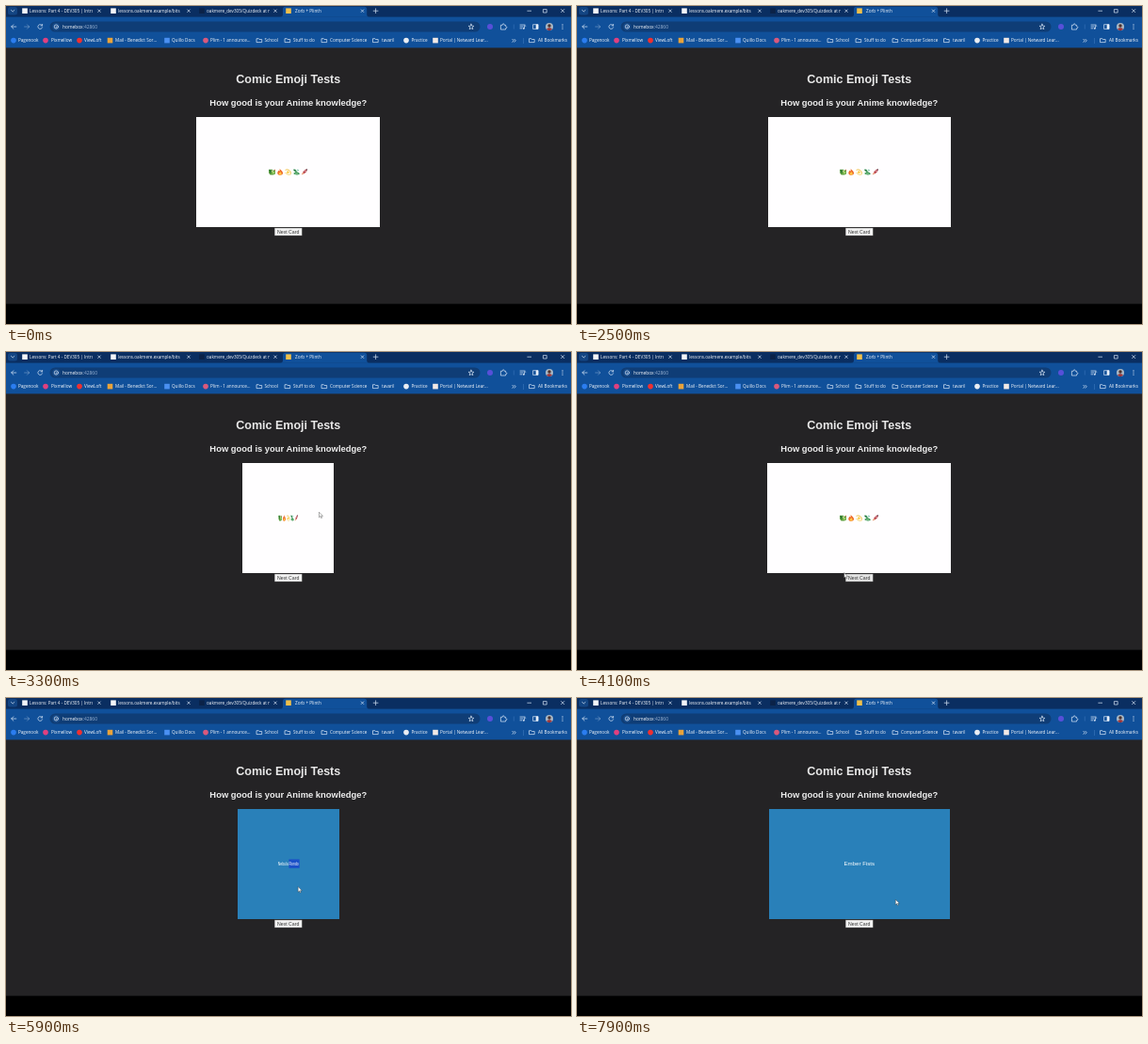
These frames come from a looping animation (600 by 338 pixels, 8 s). An HTML page:

```html
<!DOCTYPE html>
<html lang="en">
<head>
<meta charset="utf-8">
<title>Emoji cards</title>
<style>
  html, body { margin: 0; width: 100%; height: 100%; overflow: hidden; background: #000; }
  svg { display: block; }
  #stage { width: 100%; height: 100%; }
  .ui { font: 500 4.65px "Open Sans", "Noto Sans", sans-serif; fill: #f8fafd; }
  .page { font-family: "Liberation Sans", Arial, sans-serif; text-anchor: middle; }
  .line { fill: none; stroke: #dce8f8; stroke-width: .7; stroke-linecap: round; stroke-linejoin: round; }
  #face { shape-rendering: crispEdges; }
</style>
</head>
<body>
<svg id="stage" viewBox="0 0 600 338">
  <defs>
    <!-- small pictures, about 7 units across, centred on the origin -->
    <g id="lizard">
      <path d="M-3.5-2.6H0L1-1.6 3.4-2.2V2.2L1.4 3H-2L-3.5 1.2Z" fill="#5a9e3c"/>
      <path d="M-3.3-2.4H-1.2L-.6.2-2.2 1.4Z" fill="#2f7a35"/>
      <path d="M.4-1.2 3 0 1.8 2.3-.4 1.4Z" fill="#9fce6a"/>
      <circle cx=".2" cy="-1" r=".6" fill="#fff3c4"/>
      <path d="M2.2-2.2 3.4-3 3.2-.8Z" fill="#c8603a"/>
    </g>
    <g id="fire">
      <path d="M-.5-3.4C.4-2 2.9-.8 2.9 1.2 2.9 2.6 1.6 3.4 0 3.4S-2.9 2.6-2.9 1C-2.9-.2-2.1-.8-1.8-1.7-1.3-1.3-1-1-.8-.7-.4-1.6-.4-2.4-.5-3.4Z" fill="#ee6a2a"/>
      <path d="M.2-.4C.5.5 1.6.9 1.5 2 1.4 2.9.7 3.2 0 3.2S-1.5 2.8-1.5 1.9-.2.7.2-.4Z" fill="#ffc845"/>
    </g>
    <g id="swirl" fill="none" stroke-linecap="round">
      <path d="M-2.8-2.2C0-3.4 2.9-1.2 2.6 1.2" stroke="#f0b92c" stroke-width=".9"/>
      <path d="M-3 1C-2 3 1.2 3.4 2.9 2.4" stroke="#f3c950" stroke-width=".8"/>
      <path d="M-.4-1.7.2-.5 1.4-.4.5.5.8 1.7-.4 1.1-1.5 1.7-1.3.5-2.2-.4-.9-.5Z" fill="#f8c93a"/>
    </g>
    <g id="dragon">
      <path d="M-3.2-2.6C-1-3.4.2-2 .2-.8S2.2.2 3.2 1.4 2 3.3.4 3-3 3-2.8 1.6-.6.8-1.2-.2-3.4-1-3.2-2.6Z" fill="#3f9a5b"/>
      <path d="M.6-2.8 2.8-1.9 1.5-.6Z" fill="#63b8a0"/>
      <path d="M-1.6 2.1C-.4 1.4.8 1.5 1.8 2.2" fill="none" stroke="#d9efc5" stroke-width=".6"/>
      <circle cx="-1.8" cy="-1.7" r=".5" fill="#1d3b2a"/>
    </g>
    <g id="rocket">
      <path d="M3.2-3.2C1.4-3.2-.6-1.6-1.8.4L-.4 1.8C1.6.6 3.2-1.4 3.2-3.2Z" fill="#b9444e"/>
      <path d="M3.2-3.2 1.4-2.7 2.7-1.4Z" fill="#5b6470"/>
      <path d="M-1.8.4-3.2 3.2-.4 1.8Z" fill="#e58b62"/>
      <circle cx="1" cy="-1" r=".6" fill="#f3d5d5"/>
    </g>
    <g id="burst">
      <path d="M0-3.2.9-1.5 2.9-2.2 2-.2 3 1.4 1.1 1.4.4 3.2-.8 1.6-2.8 2.2-1.8.4-3.1-1.1-1.1-1.3Z" fill="#d8383a"/>
      <circle r=".9" fill="#f3a13a"/>
    </g>
    <g id="arm">
      <path d="M-2.6-3H-.4L-.2-1.6-1.4-1-1 .4C.4-.8 3.3-.4 3.3 1.5S1.4 3.1-.4 3-3.4 2.6-3.2.6Z" fill="#f8bd33"/>
      <path d="M-1 .4C-.4.8.2 1 .9 1" fill="none" stroke="#d18c1d" stroke-width=".4"/>
    </g>
    <g id="fist">
      <rect x="-3.3" y="-2.6" width="6.6" height="5.3" rx="1.8" fill="#f6b93a"/>
      <path d="M-1.5-2.2V0M.2-2.3V0M1.8-2.2V0M-2.6.6H1.4" fill="none" stroke="#cd841f" stroke-width=".45"/>
    </g>
    <g id="hat">
      <path d="M-3.4.8C-1.8 2.4 1.8 2.4 3.4.8L1.9.6C1.8-3 .7-2.4 0-2S-1.8-3-1.9.6Z" fill="#94602f"/>
      <path d="M-1.9.1C-.8.7.8.7 1.9.1" fill="none" stroke="#5e3817" stroke-width=".7"/>
    </g>
    <g id="note">
      <path d="M-1.2 2V-2.7L2.4-3.2V1.4" fill="none" stroke="#39465a" stroke-width=".8"/>
      <circle cx="-2" cy="2.1" r="1.1" fill="#39465a"/><circle cx="1.6" cy="1.5" r="1.1" fill="#39465a"/>
    </g>
    <path id="folder" d="M-2.6-1.9H-.6L0-1.1H2.7V2H-2.6Z" class="line"/>
    <path id="close" d="M-1.3-1.3 1.3 1.3M1.3-1.3-1.3 1.3" class="line"/>
  </defs>

  <rect width="600" height="338" fill="#000"/>
  <rect y="44" width="600" height="272.6" fill="#242325"/>
  <rect width="600" height="12" fill="#0a2e61"/>
  <rect y="11.6" width="600" height="32.8" fill="#10509a"/>

  <g id="chrome" class="ui">
    <rect x="2" y="1" width="10" height="8.5" rx="2.5" fill="#134583"/>
    <path d="M5.5 4.4 7.2 6 8.9 4.4" class="line"/>
    <path d="M291 11.7C293.4 11.7 294 10.4 294 9V3.5Q294 .8 296.7.8H380.5Q383.2.8 383.2 3.5V9C383.2 10.4 383.8 11.7 386.2 11.7Z" fill="#10509a"/>
    <path d="M390.2 5.2H395M392.6 2.8V7.6M553.8 5.2H557.6M570.8 3.6H574.2V7H570.8ZM589.6 3.5 592.8 6.7M592.8 3.5 589.6 6.7" class="line"/>

    <rect x="46.5" y="16.4" width="457" height="11.2" rx="5.6" fill="#0f3d76"/>
    <path d="M10.8 22H5.8M7.9 19.8 5.7 22 7.9 24.2" class="line"/>
    <path d="M19.6 22H24.6M22.5 19.8 24.7 22 22.5 24.2" class="line" opacity=".45"/>
    <path d="M38.3 20.6A2.4 2.4 0 1 0 38.6 22.8M38.6 19.4V20.9H37" class="line"/>
    <circle cx="53.3" cy="22" r="4" fill="#174b8a"/>
    <circle cx="53.3" cy="22" r="2.1" class="line"/>
    <path d="M53.3 21.9V23" class="line"/>
    <text x="60" y="23.8" font-size="4.9">homebox<tspan fill="#9db6d6">:42860</tspan></text>
    <path d="M494 19.2 494.8 21.2 496.9 21.3 495.3 22.7 495.8 24.7 494 23.6 492.2 24.7 492.7 22.7 491.1 21.3 493.2 21.2Z" class="line"/>
    <circle cx="514" cy="22" r="3" fill="#5750d8"/>
    <path d="M525.8 20.3H527.2Q527.2 18.8 528.2 18.8T529.2 20.3H530.6V21.7Q531.9 21.7 531.9 22.7T530.6 23.7V25H525.8Z" class="line"/>
    <path d="M539.3 19.5V24.5" stroke="#3b78bd" stroke-width=".6"/>
    <path d="M546 20H551M546 21.9H549M546 23.8H548M550.4 23.6V20.8L551.8 21.2" class="line"/>
    <circle cx="549.8" cy="23.8" r=".9" fill="#dce8f8"/>
    <path d="M560 19.7H565V24.4H560Z" class="line"/>
    <rect x="562.7" y="19.5" width="2.5" height="5" fill="#e8f0fa"/>
    <circle cx="577" cy="22" r="4" fill="#a9b7c4"/>
    <path d="M574.2 24.8C574.4 22.8 579.6 22.8 579.8 24.8A4 4 0 0 1 574.2 24.8Z" fill="#9c3438"/>
    <circle cx="577" cy="21" r="1.7" fill="#4a302b"/>
    <g fill="#e8f0fa"><circle cx="591" cy="19.9" r=".6"/><circle cx="591" cy="22" r=".6"/><circle cx="591" cy="24.1" r=".6"/></g>

    <path d="M537.8 35.3 539.2 36.8 537.8 38.3M539.9 35.3 541.3 36.8 539.9 38.3" class="line"/>
    <path d="M549.5 34V40" stroke="#3b78bd" stroke-width=".6"/>
  </g>

  <g class="page">
    <text x="299.8" y="82.2" font-size="12.5" font-weight="700" fill="#e8e8e8">Comic Emoji Tests</text>
    <text x="299.8" y="106.1" font-size="9.41" font-weight="700" fill="#efefef">How good is your Anime knowledge?</text>
    <g id="card">
      <rect id="face" x="-97.65" y="-58.6" width="195.3" height="117.2"/>
      <g id="front"></g>
      <g id="back" font-size="6.25" fill="#fff">
        <rect id="mark" y="-4.8" height="9.4" fill="#1b50c8"/>
        <text id="answer" y="2.2"></text>
      </g>
    </g>
    <rect id="button" x="285.2" y="236" width="29" height="8" stroke="#767676" stroke-width=".4"/>
    <text x="299.7" y="241.9" font-size="5.2" fill="#333">Next Card</text>
  </g>
  <path id="cursor" d="M0 0V5.6L1.3 4.4 2.2 6.4 3.1 6 2.2 4.1H4Z" fill="#fff" stroke="#333" stroke-width=".4"/>
</svg>

<script>
const LOOP = 8000, FLIP = 600;
const $ = id => document.getElementById(id);
const NS = "http://www.w3.org/2000/svg";

function add(parent, tag, attrs, text) {
  const el = document.createElementNS(NS, tag);
  for (const k in attrs) el.setAttribute(k, attrs[k]);
  if (text) el.textContent = text;
  return parent.appendChild(el);
}
const use = (parent, id, x, y) => add(parent, "use", { href: "#" + id, x, y });

// Tabs: icon x, text x, text width, close x, icon colour, title
[
  [20, 25, 67, 99, "#f4f6f9", "Lessons: Part 4 - DEV305 | Introduction"],
  [114, 119, 66, 194, "#f4f6f9", "lessons.oakmere.example/bits"],
  [208, 213, 67, 286, "#0b2248", "oakmere_dev305/Quizdeck at main"],
  [300, 307, 62, 378.5, "#f0c04a", "Zorb + Plinth"]
].forEach(([ix, tx, w, cx, fill, title]) => {
  add($("chrome"), "rect", { x: ix - 2.8, y: 2.4, width: 5.6, height: 5.6, fill });
  const clip = add($("chrome"), "svg", { x: tx, y: 0, width: w, height: 11 });
  add(clip, "text", { x: 0, y: 6.9 }, title);
  use($("chrome"), "close", cx, 5.2);
});

// Bookmarks: icon x, text x, label, icon shape and colour (a folder if absent)
[
  [8, 13, "Pagenook", "circle", "#2b7df0"],
  [42, 48, "Pixmellow", "circle", "#e0407f"],
  [78, 83, "ViewLoft", "circle", "#f03030"],
  [110.5, 116, "Mail - Benedict Sor...", "square", "#e8a33a"],
  [171, 176, "Quillo Docs", "square", "#4a90f2"],
  [212, 217, "Plim - 1 announce...", "circle", "#d9597c"],
  [269, 274.5, "School"],
  [299, 305, "Stuff to do"],
  [338, 344, "Computer Science"],
  [392.5, 399, "tavaril"],
  [425, 430.5, "Practice", "circle", "#e9edf3"],
  [456, 461, "Portal | Netward Lear...", "square", "#f1e9e6"],
  [558.5, 565, "All Bookmarks"]
].forEach(([ix, tx, label, shape, fill]) => {
  if (!shape) use($("chrome"), "folder", ix, 36.6);
  else add($("chrome"), "rect", { x: ix - 2.8, y: 33.8, width: 5.6, height: 5.6, rx: shape === "circle" ? 2.8 : 0, fill });
  add($("chrome"), "text", { x: tx, y: 38.3 }, label);
});

const cards = [
  { from: 0, pics: "lizard fire swirl dragon rocket", answer: "Paper Kestrel" },
  { from: 4250, pics: "hat rocket note swirl burst", answer: "Nebula Rondo", mark: [1.2, 20.4] },
  { from: 6850, pics: "dragon fire burst arm fist", answer: "Ember Fists" }
];
cards.forEach(card => {
  card.row = add($("front"), "g", {});
  card.pics.split(" ").forEach((id, i) => use(card.row, id, (i - 2) * 8.6, .2));
});

const flips = [2470, 3068, 5000, 5776, 7480];
// Cursor: time, x, y
const path = [
  [2550, 345, 160], [2900, 335, 168], [3300, 332.5, 170.2], [3600, 330, 174], [4050, 283.4, 234.2],
  [4150, 284, 234.8], [4300, 289, 239], [4600, 290, 239], [5000, 309, 203], [5900, 310.2, 200.6],
  [6350, 311, 202], [6750, 303, 240], [6950, 303, 241], [7200, 322.9, 225.2], [7480, 334, 217], [7900, 338.3, 214.2]
];

// The CSS "ease" curve, solved by bisection
function ease(x) {
  const bez = (a, b, u) => 3 * a * u * (1 - u) ** 2 + 3 * b * u * u * (1 - u) + u ** 3;
  let lo = 0, hi = 1;
  for (let i = 0; i < 24; i++) {
    const mid = (lo + hi) / 2;
    if (bez(.25, .25, mid) < x) lo = mid; else hi = mid;
  }
  return bez(.1, 1, lo);
}

function turn(t) {
  let half = 0;
  flips.forEach((start, i) => {
    const p = ease(Math.min(1, Math.max(0, (t - start) / FLIP)));
    half += i % 2 ? -p : p;
  });
  return half;
}

function cursorAt(t) {
  const i = path.findIndex(p => p[0] > t);
  if (i === 0) return null;
  if (i < 0) return path[path.length - 1].slice(1);
  const [a, b] = [path[i - 1], path[i]];
  const k = (t - a[0]) / (b[0] - a[0]), s = k * k * (3 - 2 * k);
  return [a[1] + (b[1] - a[1]) * s, a[2] + (b[2] - a[2]) * s];
}

function draw(t) {
  const c = Math.cos(Math.PI * turn(t)), isFront = c >= 0;
  const card = cards.filter(d => t >= d.from).pop();
  $("card").setAttribute("transform", `translate(299.75 176.2) scale(${Math.max(Math.abs(c), .001)} 1)`);
  $("face").setAttribute("fill", isFront ? "#fffeff" : "#2980b9");
  $("front").style.display = isFront ? "" : "none";
  $("back").style.display = isFront ? "none" : "";
  cards.forEach(d => d.row.style.display = d === card ? "" : "none");
  if ($("answer").textContent !== card.answer) $("answer").textContent = card.answer;
  const [mx, mw] = card.mark || [0, 0];
  $("mark").setAttribute("x", mx);
  $("mark").setAttribute("width", mw);

  const pos = cursorAt(t);
  $("cursor").style.display = pos ? "" : "none";
  if (pos) $("cursor").setAttribute("transform", `translate(${pos})`);
  const over = pos && pos[0] > 283 && pos[0] < 314 && pos[1] > 234 && pos[1] < 244;
  $("button").setAttribute("fill", over ? "#e5e5e5" : "#f3f3f3");
}

const begin = performance.now();
function tick() {
  draw((performance.now() - begin) % LOOP);
  requestAnimationFrame(tick);
}
tick();
</script>
</body>
</html>
```
